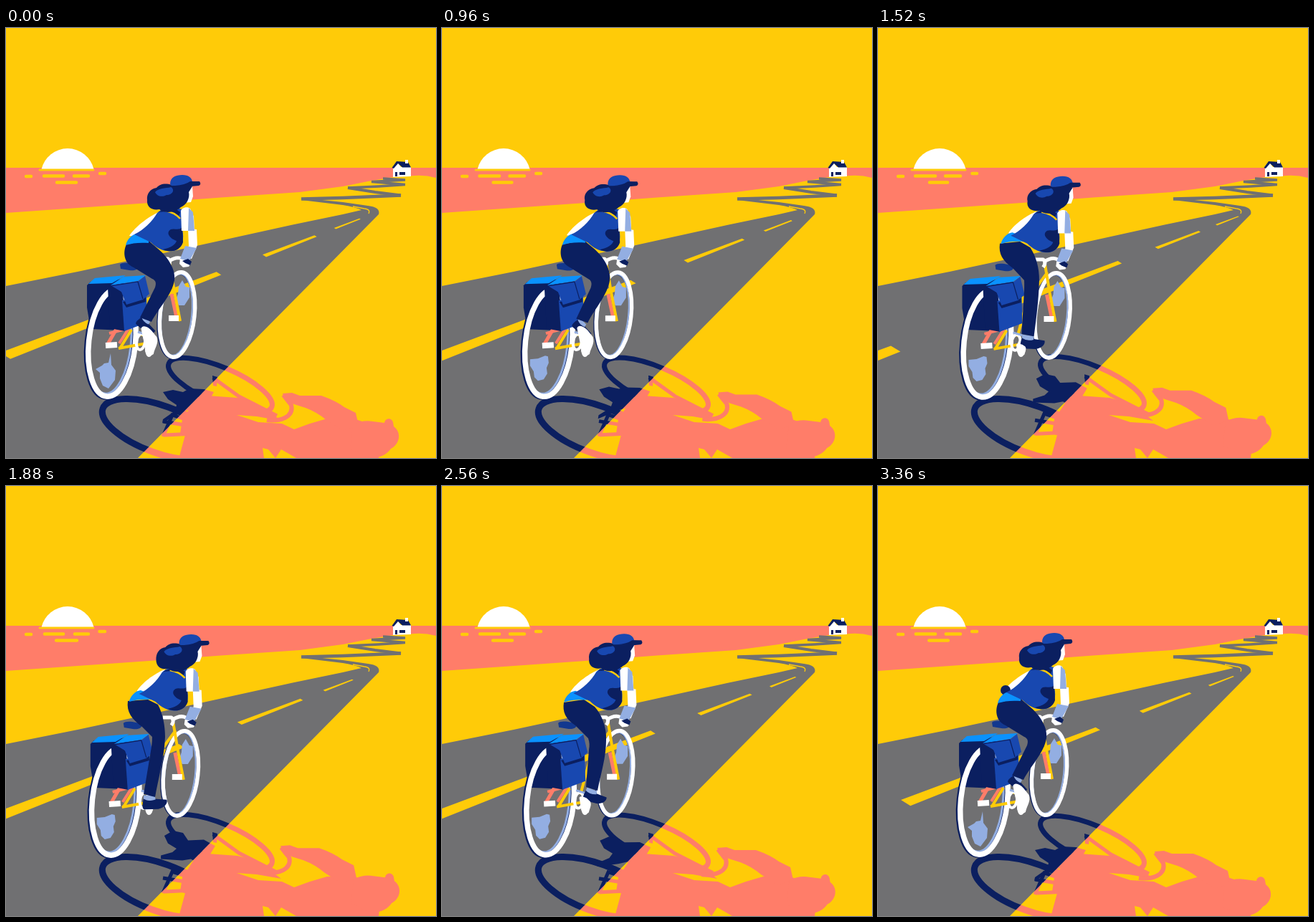
Write an HTML page with a canvas that moves like this. It is 600 px wide and 600 px high and loops after 3400 ms.

```html
<!DOCTYPE html>
<html lang="en">
<head>
<meta charset="utf-8">
<title>Evening ride</title>
<style>
html, body { margin: 0; height: 100%; overflow: hidden; background: #ffcb08; }
canvas { display: block; width: 100vw; height: 100vh; }
</style>
</head>
<body>
<canvas id="stage" width="600" height="600"></canvas>
<script>
const ctx = document.getElementById('stage').getContext('2d');
const YELLOW = '#ffcb08', CORAL = '#ff7d69', ROAD = '#707072', NAVY = '#0b1f60',
  BLUE = '#1848b0', SKY = '#0a92ff', PALE = '#93aee2', WHITE = '#fff';
const STEP = 40, FRAMES = 85, TAU = Math.PI * 2;
const NUM = /-?\d+\.?\d*/g;

const fill = (color, d) => { ctx.fillStyle = color; ctx.fill(new Path2D(d)); };
const line = (color, width, d) => {
  ctx.strokeStyle = color;
  ctx.lineWidth = width;
  ctx.stroke(new Path2D(d));
};
const ring = (color, width, x, y, rx, ry, deg) => {
  ctx.beginPath();
  ctx.ellipse(x, y, rx, ry, deg * TAU / 360, 0, TAU);
  ctx.strokeStyle = color;
  ctx.lineWidth = width;
  ctx.stroke();
};
const oval = (color, x, y, rx, ry, deg = 0) => {
  ctx.beginPath();
  ctx.ellipse(x, y, rx, ry, deg * TAU / 360, 0, TAU);
  ctx.fillStyle = color;
  ctx.fill();
};
const shifted = (x, y, draw) => {
  ctx.save();
  ctx.translate(x, y);
  draw();
  ctx.restore();
};
const smooth = (a, b, x) => {
  const t = Math.min(1, Math.max(0, (x - a) / (b - a)));
  return t * t * (3 - 2 * t);
};

// Blend two strings that hold the same sequence of numbers.
const mix = (a, b, k) => {
  const to = b.match(NUM);
  let i = 0;
  return a.replace(NUM, v => (+v + (to[i++] - v) * k).toFixed(2));
};
const pose = (keys, p) => {
  const i = keys.findIndex(key => key[0] > p);
  const [a, from] = keys[i - 1], [b, to] = keys[i];
  return mix(from, to, (p - a) / (b - a));
};

const ROAD_SHAPE = 'M0 360L100 340L200 318.5L300 296.5L400 274.5L470 260L496 254Q488 250 470 247L412 240V237L470 243L505 248Q523 250 520 260L184 600H0Z';

const LEG_UP = 'M168 302C163 312 164 328 178 334L204 350C209 352 210 356 208 362L187 404L203 410C212 392 232 372 235 352C237 335 224 318 212 308L198 296Z';
const LEG_MID = 'M170 302C168 315 172 325 186 334L204 352C206 358 206 362 205 368L201 420L217 425C222 400 229 378 229 355C230 335 222 318 213 308L198 298Z';
const LEG_DOWN = 'M170 300C168 315 175 325 190 336L204 352C203 358 203 364 203 370L200 432L218 434C220 410 221 380 222 350C222 335 219 318 212 305L198 298Z';
const LEG_BACK = 'M170 300C168 315 175 325 190 336L204 350C204 358 203 364 202 370L192 430L208 434C212 410 221 380 222 350C222 335 219 318 212 305L198 298Z';
const LEG = [[0, LEG_UP], [.259, LEG_MID], [.4, LEG_DOWN], [.66, LEG_BACK], [.86, LEG_UP], [1.01, LEG_UP]];
// Ankle x, y and shoe angle.
const FOOT = [[0, '196 406 46'], [.259, '209 424 20'], [.4, '209 434 0'], [.66, '200 433 4'], [.86, '196 408 50'], [1.01, '196 406 46']];

function scenery(f) {
  fill(YELLOW, 'M0 0H600V600H0Z');
  fill(CORAL, 'M0 195H600V209Q585 205 570 206L540 208L510 213L470 221L410 229L300 236.5L200 244L100 251L0 258Z');
  fill(WHITE, 'M49.5 197A37.5 37.5 0 0 1 122.5 197Z');
  ctx.lineCap = 'round';
  line(YELLOW, 3, 'M47 198H122');
  const w = Math.sin(f / FRAMES * TAU * 2) * 1.5;
  line(YELLOW, 4.5, `M28 207H35M${53 + w} 206.5H80M${95 + w} 206.5H115M${131 - w / 2} 203H138M${71 - w} 215.5H${98 + w}`);
  ctx.lineCap = 'butt';
}

function road(f) {
  fill(ROAD, ROAD_SHAPE);
  ctx.lineJoin = 'miter';
  ctx.miterLimit = 3;
  line(ROAD, 4.5, 'M412 238.5L470 237L551 233.5');
  line(ROAD, 4, 'M551 233.5L515 229L477 223');
  line(ROAD, 3.5, 'M477 223L520 221L557 218.500M557 218.500L510 214.500L557 212L526 210');
  line(YELLOW, 1.3, 'M484 249L500 252Q509 253 506 259');

  // Dashes are evenly spaced in depth.
  const phase = f * 4 / FRAMES % 1, gap = .00162;
  const at = z => 661 - 1 / Math.max(z, .0007);
  const mid = x => 457 - .386 * x;
  const half = x => (560 - x) * .0125;
  for (let n = -2; n < 3; n++) {
    const shift = (n - phase) * gap;
    let a = at(.0033 + shift), b = at(.004367 + shift);
    if (a < 200) a -= (200 - a) * .55;
    if (b < 200) b += (200 - b) * .2;
    if (a > 492 || b < -20) continue;
    b = Math.min(b, 503);
    const ha = half(a), hb = half(b);
    fill(YELLOW, `M${a} ${mid(a) - ha}L${b - hb} ${mid(b - hb) - hb}L${b + hb} ${mid(b + hb) + hb}L${a + 2 * ha} ${mid(a + 2 * ha) + ha}Z`);
  }
}

function house() {
  fill(WHITE, 'M540 208V195L546 187L551 194H565V207Z');
  fill(NAVY, 'M545 186L561 187L565 194.500H553L547 189L541 196L538.500 195Z');
  fill(WHITE, 'M557 184H561V189H557Z');
  fill(NAVY, 'M543 201H546V207H543ZM549 201H557V205H549Z');
}

function shadow(color, k) {
  ring(color, 9, 215, 560, 85, 33, 20);
  shifted(0, -2 * k, () => {
    ring(color, 7, 299, 498.5, 78, 25, 23);
    line(color, 5, 'M289 488L325 514L378 541M219 570L232 540L262 550M219 549L280 559M222 568L262 566');
    fill(color, 'M288 485L295 487L294 500L289 499Z');
  });
  // Saddle, bags and feet.
  fill(color, mix(
    'M219 508L233 505L247 508L256 503L276 504L290 508L275 535L258 532L246 536L218 551L219 546L236 534L238 526L226 518Z',
    'M221 487L233 480L247 483L254 494L276 493L292 502L275 530L258 520L246 522L216 519L216 514L232 510L238 505L226 498Z', k));
  // Trunk and legs.
  fill(color, 'M244 600L246 584L258 571L243 566L246 546L262 522L281 513L323 516L346 522L368 536L384 548L350 542L322 540L352 550L385 552L402 560L424 552L448 545L488 546L500 550L522 582L520 600H405L384 588L376 600L366 588L358 586L360 600Z');
  fill(color, 'M240 605L250 568H350V605Z');
  shifted(-3 * k, -8 * k, () => {
    line(color, 6, 'M387 512Q393 520 398 526Q401 538 389 544Q378 549 364 547');
    fill(color, 'M386 510L399 509L410 513L440 513Q460 520 472 529L488 537L492 555L470 562L447 547Q434 536 418 530L402 525L388 517Z');
  });
  // Head and cap.
  shifted(k, -5 * k, () => {
    fill(color, 'M484 553C494 549 502 547 512 549L528 551C529 544 538 543 540 550L541 556C552 564 550 580 537 587C528 601 505 604 492 592L480 588Z');
  });
}

function bike(k, p) {
  // Far bag.
  fill(NAVY, 'M113 359L118 354L165 350V422L118 420L113 390Z');
  fill(SKY, 'M115 357L124 349L167 345L148 356Z');
  // Rear wheel.
  ring(NAVY, 8, 145.5, 440, 32, 75, 6);
  ring(PALE, 3, 145.5, 440, 28.8, 70.5, 6);
  ring(WHITE, 7.5, 148, 439.5, 32.5, 75, 6);
  const burst = 'M146 454L147 470L153 478L152 491L143 503L135 499L131 489L131 481L125 476L134 471L137 468L143 467Z';
  const blot = 'M143 457L147 458L148 467L145 474L146 482L141 490L133 492L128 487L127 479L122 471L122 462L133 461Z';
  fill(PALE, mix(burst, blot, smooth(0, .15, p) - smooth(.85, .96, p)));
  // Front wheel.
  ring(NAVY, 4, 237, 401, 24, 59, 6);
  ring(PALE, 2, 238, 400, 21.2, 57, 6);
  ring(WHITE, 5.5, 239, 400, 24, 59.5, 6);
  fill(PALE, 'M241 360L246 352L251 361L256 362L256 376L249 387L241 387L237 379L240 371Z');
  // Frame.
  ctx.lineJoin = 'round';
  line(CORAL, 5, 'M142 441L154 420M231 371L238 404');
  line(CORAL, 4, 'M158 440L172 418M144 426L174 418');
  line(YELLOW, 4, 'M157 447L196 440M159 447L175 421M232 340L204 378L190 430M228 326L235 368L243 409');
  line(WHITE, 8, 'M139 443L155 442M227 405L241 405');
  ring(WHITE, 4, 188, 438, 6, 11, 8);
  line(PALE, 3, 'M184 424L197 428');
  // Near bag.
  fill(NAVY, 'M142 362L147 357L163 369L166 423L145 419Z');
  fill(BLUE, 'M162 380L196 374L197 411L165 423Z');
  fill(NAVY, 'M163 382L195 376V382L168 390Z');
  fill(SKY, 'M146 359L164 347L195 345L184 353Z');
  fill(BLUE, 'M146 359L185 353L194 346L200 371L191 379L168 386L161 368Z');
  line(NAVY, 1.2, 'M146 360L184 354L191 378');
  // Saddle and handlebar.
  fill('#12388f', 'M159 330C162 326 178 328 185 332C185 338 177 339 172 338L160 336Z');
  line(WHITE, 5, 'M214 322L226 322Q231 326 226 333M226 326Q238 318 246 322L256 328');
}

function foot(p) {
  const [x, y, deg] = pose(FOOT, p).split(' ').map(Number);
  const tip = Math.max(0, deg / 50);
  oval(WHITE, 200, 446, 6, 13, 3);
  ctx.save();
  ctx.translate(x, y);
  ctx.rotate(deg * TAU / 360);
  ctx.scale(1 - tip * .2, 1 - tip * .2);
  fill(NAVY, 'M-8 3C-9 11-10 19-5 19L14 17C23 14 27 8 25 3L8 3Q0 8-8 3Z');
  fill(PALE, 'M-8-1L8-1L9 4Q0 8-8 4Z');
  ctx.restore();
  // The sole shows as the heel lifts.
  if (tip > .1) {
    fill(WHITE, mix(
      'M194 447C194 446 198 446 201 446L204 447C206 448 206 450 204 456C200 459 195 456 194 452Z',
      'M188 417C190 411 198 414 203 420L211 430C214 440 208 445 206 455C200 460 193 455 194 445Z', tip));
  }
}

function rider(k, p) {
  // Far arm.
  shifted(6 * k, 0, () => fill(WHITE, mix(
    'M216 256C203 260 180 277 172 290L184 291L212 278Z',
    'M216 256C205 260 186 272 177 286L190 289L212 278Z', k)));
  if (p > .94) oval(NAVY, 178, 285, 7, 7);
  foot(p);
  fill(NAVY, pose(LEG, p));
  shifted(5 * k, -2 * k, () => fill(SKY, 'M167 303C169 295 175 288 183 287L199 293L199 300C187 299 176 300 167 303Z'));
  // Jersey.
  shifted(7 * k, 2 * k, () => {
    fill(BLUE, 'M216 254L228 249L246 253L246 282C249 294 246 304 239 309C228 315 213 310 202 299L179 288C192 282 204 270 211 258Z');
    fill(NAVY, 'M246 278L247 299C243 311 231 314 219 309C229 307 237 302 238 297C227 293 223 285 230 281C235 279 241 283 246 278Z');
    fill(NAVY, 'M212 257L232 249L243 257L241 262L224 256Z');
    line(YELLOW, 2.5, 'M222 255Q235 257 243 266');
  });
  // Near arm.
  shifted(7 * k, 4 * k, () => {
    fill(WHITE, 'M254 280L266 281L267 303L259 322L248 319L255 304Z');
    fill(WHITE, 'M244 255C246 250 254 249 257 252L262 263L263 283L245 283Z');
    fill(PALE, 'M255 251L261 257L263 283L254 283Z');
    fill(PALE, 'M250 304L266 307L257 323L250 329L243 322Z');
    fill(WHITE, 'M243 322L250 324L258 328L255 333L247 334L242 329Z');
    fill(NAVY, 'M246 325L254 322L259 326L257 331L250 328Z');
  });
  // Head, hair and cap.
  shifted(13 * k, 2 * k, () => {
    fill(WHITE, 'M252 221L260 221L261 235L258 243L247 244Z');
    const flap = Math.sin(p * TAU * 2);
    fill(NAVY, `M231 219C222 216 214 218 210 223C201 224 ${196 + flap} 232 197 240C${196 + flap} 250 204 255 214 253C222 260 237 257 244 250C252 247 257 237 255 229L260 221L240 216Z`);
    fill(BLUE, 'M208 229C213 223 222 224 230 222C236 225 233 233 224 233C217 237 210 234 208 229Z');
    fill(BLUE, 'M229 218C229 208 237 205 246 205C255 205 259 209 260 214L268 215L262 220L231 220Z');
    fill(NAVY, 'M257 214L270 214Q273 218 269 220L258 221L236 220Q250 219 257 214Z');
  });
}

const start = performance.now();

function draw() {
  const f = Math.floor((performance.now() - start) / STEP) % FRAMES;
  const p = f * 3 / FRAMES % 1;
  const sway = smooth(.03, .42, p) - smooth(.62, .93, p);
  scenery(f);
  shadow(CORAL, sway);
  road(f);
  ctx.save();
  ctx.clip(new Path2D(ROAD_SHAPE));
  shadow(NAVY, sway);
  ctx.restore();
  house();
  shifted(5 * sway, sway, () => bike(sway, p));
  rider(sway, p);
  requestAnimationFrame(draw);
}
draw();
</script>
</body>
</html>
```
